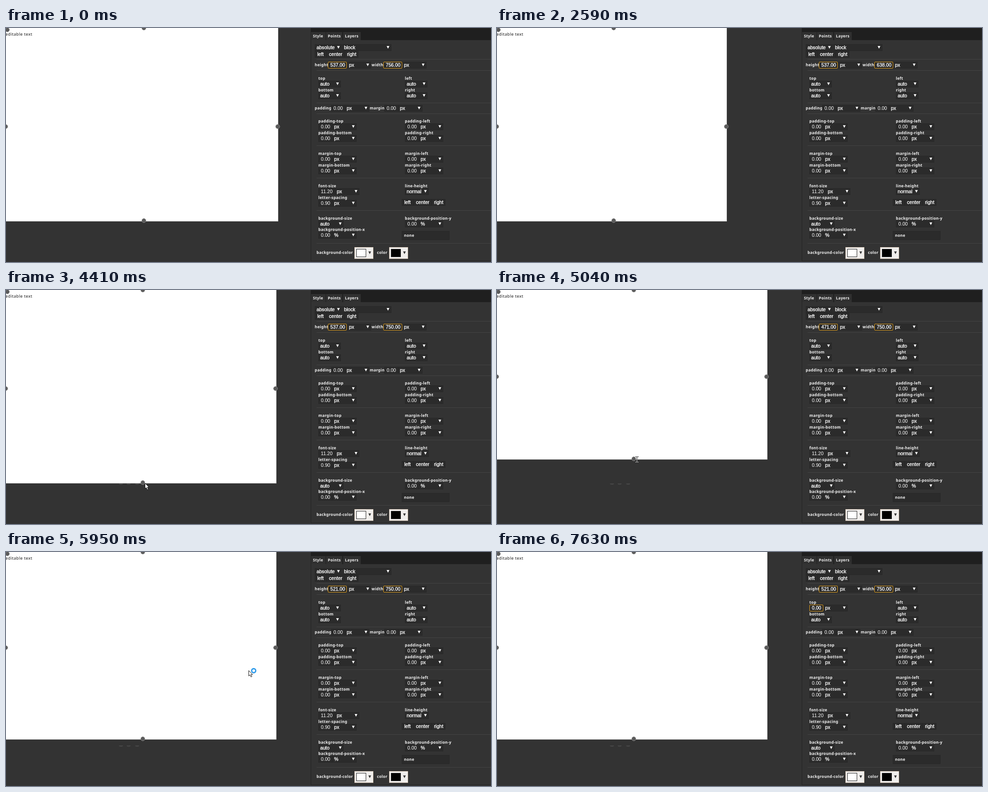
These frames come from a looping animation (1076 by 520 pixels, 8000 ms). An HTML page with a canvas:

```html
<!DOCTYPE html>
<html lang="en">
<head>
<meta charset="utf-8">
<title>Style panel resize</title>
<style>
html, body { margin: 0; width: 100%; height: 100%; overflow: hidden; background: #333; }
canvas { display: block; }
</style>
</head>
<body>
<canvas id="stage" width="1076" height="520"></canvas>
<script>
const ctx = document.getElementById('stage').getContext('2d');
const LOOP = 8000, TICK = 70, SCALE = 0.8;
const LABEL = 'bold 8.5px "Noto Sans", sans-serif';
const CONTROL = '10.67px "Liberation Sans", Arial, sans-serif';

// Each key is [time, value, ...].
const widthKeys = [[2240, 756], [2660, 629], [2730, 629], [3080, 672], [3220, 750]];
const heightKeys = [[4620, 537], [5040, 471], [5110, 471], [5530, 534], [5740, 521]];
const pointerKeys = [
  [350, 1000, 498], [770, 980, 149], [1050, 980, 149], [1540, 598, 228],
  [1680, 603, 254], [1890, 600, 221], [3220, 599, 223], [3290, 599, 223],
  [3920, 311, 424], [4130, 311, 424], [4410, 308, 429], [5670, 311, 416],
  [5950, 538, 263], [6510, 719, 125], [6930, 719, 125], [7210, 716, 184], [7350, 715, 152]
];

function at(keys, t) {
  if (t <= keys[0][0]) return keys[0].slice(1);
  for (let i = 1; i < keys.length; i++) {
    const a = keys[i - 1], b = keys[i];
    if (t <= b[0]) {
      const p = (t - a[0]) / (b[0] - a[0]), e = p * p * (3 - 2 * p);
      return a.slice(1).map((v, k) => v + (b[k + 1] - v) * e);
    }
  }
  return keys[keys.length - 1].slice(1);
}

function rect(x, y, w, h, color) {
  ctx.fillStyle = color;
  ctx.fillRect(x, y, w, h);
}

function frame(x, y, w, h, color) {
  ctx.strokeStyle = color;
  ctx.lineWidth = 1;
  ctx.strokeRect(x + 0.5, y + 0.5, w - 1, h - 1);
}

function write(text, x, y, font, spacing, color) {
  ctx.font = font;
  ctx.letterSpacing = spacing + 'px';
  ctx.fillStyle = color;
  ctx.fillText(text, x, y);
}

const label = (text, x, y) => write(text, x, y + 3.3, LABEL, 0.35, '#f4f4f4');

function controlText(text, x, y, heavy) {
  write(text, x, y + 4, CONTROL, 0, '#fff');
  if (heavy) {
    ctx.strokeStyle = '#fff';
    ctx.lineWidth = 0.35;
    ctx.strokeText(text, x, y + 4);
  }
}

function arrowDown(x, y, color = '#fff') {
  ctx.fillStyle = color;
  ctx.beginPath();
  ctx.moveTo(x - 3, y - 3);
  ctx.lineTo(x + 3, y - 3);
  ctx.lineTo(x, y + 3);
  ctx.fill();
}

function box(x, y, w, h = 15) {
  const top = Math.round(y - h / 2);
  rect(x, top, w, h, '#2b2b2b');
  frame(x, top, w, h, '#272727');
}

function select(text, x, y, w) {
  box(x, y, w);
  controlText(text, x + 4, y, true);
  arrowDown(x + w - 7.5, y);
}

function input(text, x, y, w, active) {
  box(x, y, w);
  if (active) {
    ctx.strokeStyle = '#e5a11c';
    ctx.lineWidth = 1;
    ctx.beginPath();
    ctx.roundRect(x + 0.5, Math.round(y - 7.5) + 0.5, w - 1, 14, 1.5);
    ctx.stroke();
  }
  controlText(text, x + 5.5, y, active);
}

function amount(text, x, y, unit = 'px', extra = 0, active = false) {
  input(text, x, y, 31 + extra, active);
  select(unit, x + 31 + extra, y, 54);
}

function alignButtons(x, y) {
  [['left', 0, 26], ['center', 26, 40], ['right', 66, 31]].forEach(([text, dx, w]) => {
    box(x + dx, y, w);
    controlText(text, x + dx + 5.5, y, true);
  });
}

function swatch(x, color) {
  rect(x, 487, 42, 26, '#f0eeec');
  frame(x, 487, 42, 26, '#d8c8b8');
  rect(x + 4, 491, 22, 18, color);
  frame(x + 4, 491, 22, 18, '#222');
  arrowDown(x + 34, 499.5, '#333');
}

function drawPanel(t, w, h) {
  rect(676, 0, 400, 520, '#333');
  rect(677, 0, 399, 27, '#1f1f1f');
  rect(676, 0, 1, 518, '#222');
  rect(676, 517, 400, 1, '#242424');
  [['Style', 677, 32], ['Points', 710, 36], ['Layers', 748, 39]].forEach(([text, x, tw]) => {
    rect(x, 9, tw, 18, '#303030');
    label(text, x + 4, 18);
  });
  for (const y of [69, 94, 166, 190, 261, 333, 405, 478]) rect(689, y, 387, 1, '#444');

  select('absolute', 685, 43, 60);
  select('block', 746, 43, 109);
  alignButtons(685, 58);

  label('height', 685, 82);
  input(Math.round(h) + '.00', 714, 82, 42, true);
  select('px', 757, 82, 53);
  label('width', 811, 82);
  input(Math.round(w) + '.00', 837, 82, 42, true);
  select('px', 879, 82, 54);

  if (t < 7560) select('auto', 693, 124, 50);
  else amount('0.00', 693, 124, 'px', 0, t >= 7630);
  select('auto', 885, 124, 50);
  select('auto', 693, 150, 50);
  select('auto', 885, 150, 50);
  label('top', 693, 112);
  label('left', 885, 112);
  label('bottom', 693, 138);
  label('right', 885, 138);

  label('padding', 685, 178);
  amount('0.00', 721, 178);
  label('margin', 807, 178);
  amount('0.00', 839, 178);

  [['padding', 207], ['margin', 279]].forEach(([name, top]) => {
    ['top', 'left', 'bottom', 'right'].forEach((side, i) => {
      const x = 693 + (i % 2) * 192, y = top + (i >> 1) * 26;
      amount('0.00', x, y + 12);
      label(name + '-' + side, x, y);
    });
  });

  amount('11.20', 693, 363, 'px', 6);
  label('font-size', 693, 351);
  select('normal', 885, 363, 53);
  label('line-height', 885, 351);
  amount('0.90', 693, 389);
  label('letter-spacing', 693, 377);
  alignButtons(878, 387);

  select('auto', 693, 435, 56);
  label('background-size', 693, 422.5);
  amount('0.00', 885, 435, '%');
  label('background-position-y', 885, 422.5);
  amount('0.00', 693, 460, '%');
  label('background-position-x', 693, 448);
  box(878, 461, 106, 20);
  label('none', 883, 461);

  label('background-color', 689, 499);
  swatch(773, '#fff');
  label('color', 823, 499);
  swatch(850, '#000');
}

function handle(x, y) {
  ctx.beginPath();
  ctx.arc(x, y, 4.5, 0, Math.PI * 2);
  ctx.fillStyle = '#5a5a5a';
  ctx.fill();
  ctx.strokeStyle = '#858585';
  ctx.lineWidth = 1;
  ctx.stroke();
}

function drawPage(t, w, h) {
  // Faint marks left under the lower edge by the dragged handle.
  const marks = t < 2730 ? [] : t < 3220 ? [255] : [255, 272, 291];
  ctx.fillStyle = '#484848';
  for (const x of marks) {
    ctx.beginPath();
    ctx.ellipse(x, 430, 4.5, 2.5, 0, 0, Math.PI);
    ctx.fill();
  }
  const right = Math.floor(w * SCALE), bottom = Math.floor(h * SCALE);
  rect(0, 0, right, bottom, '#fff');
  rect(right - 1, 0, 1, bottom, '#d8d8d8');
  rect(0, bottom, right, 1, '#b5b5b5');
  write('editable text', -1, 17, '8.96px "Noto Sans", sans-serif', 0.55, '#111');

  const midX = w * SCALE / 2 + 3.5, midY = h * SCALE / 2 + 4.2;
  const endX = w * SCALE - 2, endY = h * SCALE - 1.6;
  handle(3, 4);
  handle(midX, 0);
  handle(-0.7, midY);
  handle(endX, midY);
  handle(midX, endY);
}

function drawList(y) {
  const items = ['auto', 'px', 'em', '%', 'vh'], rowH = 13.6;
  const hover = Math.max(0, Math.min(4, Math.floor((y - 131) / rowH)));
  rect(693, 131, 50, 69, '#2b2b2b');
  rect(694, 131.5 + hover * rowH, 48, rowH - 0.5, '#1e78d7');
  items.forEach((text, i) => controlText(text, 697, 138 + i * rowH, true));
  frame(693, 131, 50, 69, '#777');
}

function drawArrow(x, y, busy) {
  ctx.beginPath();
  [[0.5, 0.5], [0.5, 12.5], [3.3, 10], [5.4, 14.7], [7.6, 13.7], [5.5, 9.2], [9.2, 9.2]]
    .forEach(([dx, dy]) => ctx.lineTo(x + dx, y + dy));
  ctx.closePath();
  ctx.fillStyle = '#fff';
  ctx.fill();
  ctx.strokeStyle = '#111';
  ctx.lineWidth = 1;
  ctx.stroke();
  if (busy) {
    ctx.beginPath();
    ctx.arc(x + 11.5, y + 0.7, 4.5, 0, Math.PI * 2);
    ctx.fillStyle = '#fff';
    ctx.fill();
    ctx.strokeStyle = '#2f9bea';
    ctx.lineWidth = 3;
    ctx.stroke();
  }
}

function drawTextCursor(x, y) {
  ctx.save();
  ctx.globalCompositeOperation = 'difference';
  rect(x, y - 5, 1, 11, '#fff');
  for (const dy of [-6, 6]) {
    rect(x - 3, y + dy, 3, 1, '#fff');
    rect(x + 1, y + dy, 3, 1, '#fff');
  }
  ctx.restore();
}

function draw(now) {
  const t = Math.floor((now % LOOP) / TICK) * TICK;
  const [w] = at(widthKeys, t), [h] = at(heightKeys, t);
  const [x, y] = at(pointerKeys, t);
  rect(0, 0, 1076, 520, '#333');
  drawPage(t, w, h);
  drawPanel(t, w, h);
  if (t >= 6790 && t < 7560) drawList(y);

  const resizing = (t >= 2310 && t < 3220) || (t >= 4690 && t < 5740);
  if (t >= 4690 && t < 5740) drawTextCursor(310, Math.round(h * SCALE - 0.8));
  if (!resizing && t >= 350 && t < 7560) drawArrow(Math.round(x), Math.round(y), t >= 5880);
}

const start = performance.now();
function loop() {
  draw(performance.now() - start);
  requestAnimationFrame(loop);
}
loop();
</script>
</body>
</html>
```
